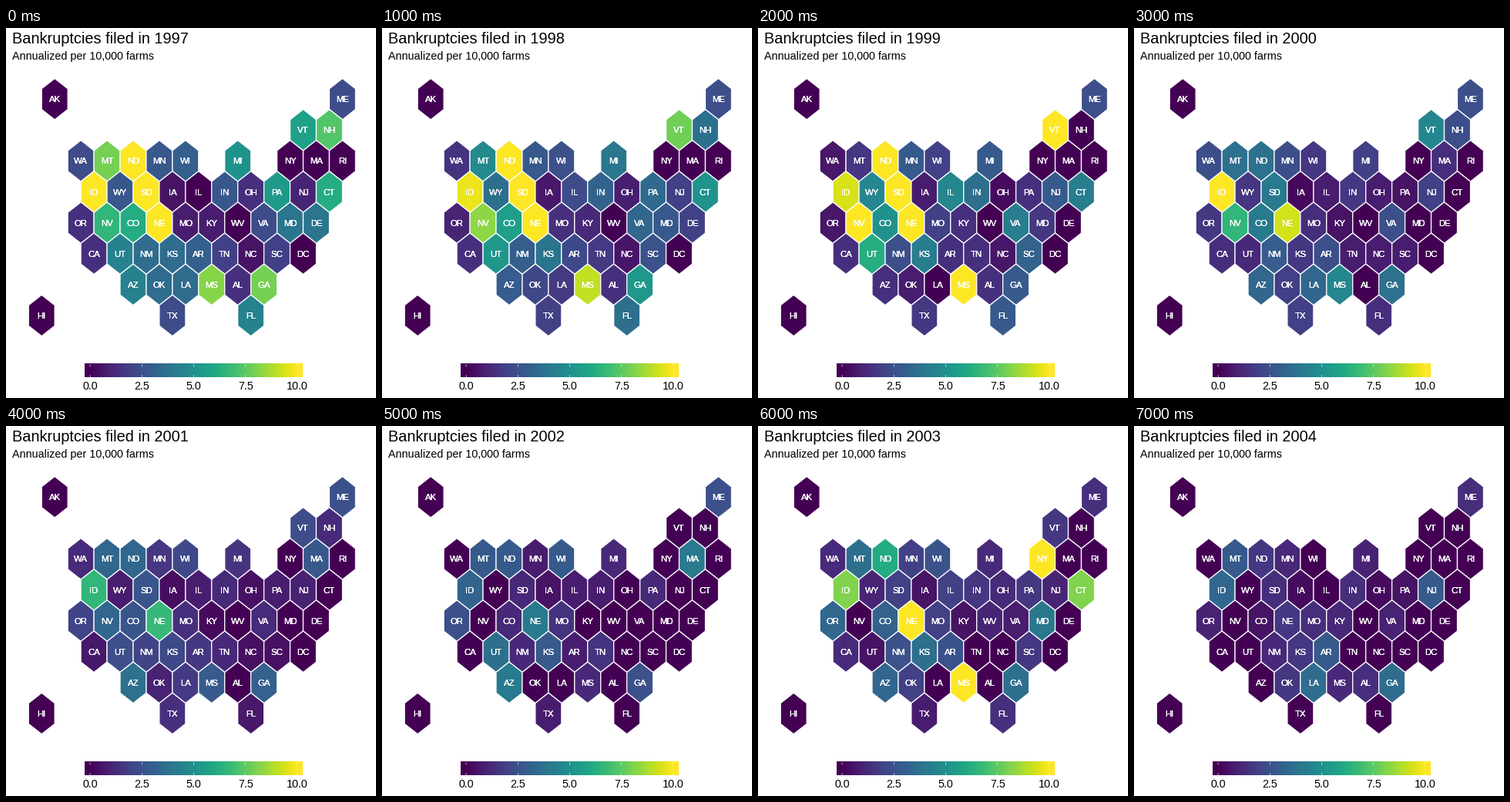
Recreate the animation shown at these times as a matplotlib script. Size 480x480 px, loop 8000 ms.

```python
import matplotlib.pyplot as plt
import numpy as np
from matplotlib.animation import FuncAnimation
from matplotlib.patches import Polygon

SIZE = 480
DPI = 100
PX = 72 / DPI  # points per pixel
FIRST_YEAR, YEARS = 1997, 8

# Hexagon grid: odd rows are shifted left by half a cell.
GRID = """
AK .. .. .. .. .. .. .. .. .. .. ME
.. .. .. .. .. .. .. .. .. .. VT NH
.. WA MT ND MN WI .. MI .. NY MA RI
.. .. ID WY SD IA IL IN OH PA NJ CT
.. OR NV CO NE MO KY WV VA MD DE ..
.. .. CA UT NM KS AR TN NC SC DC ..
.. .. .. AZ OK LA MS AL GA .. .. ..
HI .. .. .. .. TX .. .. FL .. .. ..
"""
LEFT, TOP = 63.2, 92.2
STEP_X, STEP_Y = 33.93, 40.11

# Filings per 10,000 farms; states not listed had none.
RATES = {
    1997: {10: "ND ID SD NE", 8.2: "MS", 7.9: "MT GA", 7.3: "NH", 6.6: "NV",
           6.15: "CO CT", 5.7: "VT", 5.4: "PA", 5.1: "MI", 4.4: "UT AZ FL",
           3.9: "MD DE", 3.5: "NM KS OK LA", 3.0: "WI AR", 2.7: "MN WY IN",
           2.3: "ME WA VA TX", 1.9: "TN SC", 1.4: "OH OR CA AL", 1.0: "NJ",
           0.8: "MO KY", 0.5: "IA NC"},
    1999: {10: "VT ND SD NV NE MS", 9.4: "ID", 6.2: "UT", 5.0: "CO",
           4.6: "WY IL", 4.2: "CT VA KS", 3.6: "IN", 3.1: "SC",
           2.8: "MN MI NJ GA FL", 2.4: "ME NM", 1.9: "WI MO",
           1.6: "MT MD TX", 1.4: "PA KY CA AR AL AZ TN",
           0.8: "IA OK", 0.6: "WA OR NC", 0.3: "OH"},
    2000: {10: "ID", 9.3: "NE", 6.6: "NV", 4.6: "VT MS", 4.1: "SD CO",
           3.7: "MT ND GA", 3.3: "AZ LA", 2.9: "NM",
           2.4: "ME NH WA MN VA AR", 1.9: "MI NJ OK TX",
           1.6: "WI WY IN OR KS", 1.3: "MA MO CA FL", 1.1: "UT",
           0.8: "IL OH TN NC SC", 0.5: "PA KY", 0.2: "IA"},
    2002: {4.1: "MA NE AZ", 3.6: "UT", 3.2: "ID", 2.8: "MT ND WI KS",
           2.45: "ME OR GA", 1.45: "MO TN", 1.1: "MI SD CO NM MS PA",
           0.8: "MN IL IN AR TX", 0.5: "IA"},
    2003: {10: "NY NE MS", 8.1: "ID CT", 6.1: "ND", 4.0: "MD",
           3.6: "MT KS GA", 3.3: "OR AZ", 3.1: "CO", 2.5: "WI NM AR",
           1.95: "MN SD IL OK MO", 1.6: "VT IN PA SC", 1.4: "ME FL",
           1.2: "WA MI OH CA", 1.0: "WY NJ WV", 0.75: "VA TX",
           0.5: "IA KY UT"},
    2004: {3.5: "LA GA", 3.3: "ID", 2.8: "MT NJ AR", 1.6: "ND NE KS OK",
           1.3: "ME SD IN MO AL", 1.1: "MN MS NM KY", 0.95: "MI OR VA",
           0.5: "PA CO", 0.3: "IA OH"},
}


def rate(state, year):
    """Rate of one state; a year without figures lies between its neighbours."""
    if year not in RATES:
        return (rate(state, year - 1) + rate(state, year + 1)) / 2
    return next((v for v, names in RATES[year].items()
                 if state in names.split()), 0)


fig = plt.figure(figsize=(SIZE / DPI, SIZE / DPI), dpi=DPI, facecolor="white")
ax = fig.add_axes([0, 0, 1, 1])
ax.axis("off")
cmap = plt.get_cmap("viridis")


def label(x, y, text, size, **kw):
    return ax.text(x, y, text, fontsize=size * PX, family="Liberation Sans",
                   va="baseline", **kw)


def draw_hexes():
    shape = np.array([(0, -26.75), (17, -13.4), (17, 13.4),
                      (0, 26.75), (-17, 13.4), (-17, -13.4)])
    hexes = {}
    for row, line in enumerate(GRID.split("\n")[1:-1]):
        for col, state in enumerate(line.split()):
            if state == "..":
                continue
            x = LEFT + (col - row % 2 / 2) * STEP_X
            y = TOP + row * STEP_Y
            hexes[state] = ax.add_patch(
                Polygon(shape + (x, y), ec="white", lw=1.3 * PX))
            # Overprinting gives the heavier strokes.
            for _ in range(3):
                label(x, y + 4, state, 11.4, color="white", ha="center",
                      zorder=3)
    return hexes


def draw_legend():
    x0, x1, y0, y1 = 102, 385, 436.2, 453.5
    bins = 20
    ax.imshow(np.linspace(0, 1, bins)[None], cmap=cmap, aspect="auto",
              extent=(x0, x1, y1, y0), interpolation="bilinear")
    half = (x1 - x0) / bins / 2
    for v in np.linspace(0, 10, 5):
        x = x0 + half + v / 10 * (x1 - x0 - 2 * half)
        for a, b in ((y0, y0 + 3.4), (y1 - 3.4, y1)):
            ax.plot([x, x], [a, b], color="white", lw=0.6 * PX, snap=False,
                    solid_capstyle="butt")
        label(x, 469, f"{v:.1f}", 14.4, ha="center")


title = label(8, 20, "", 20)
label(8, 41, "Annualized per 10,000 farms", 14.4)
hexes = draw_hexes()
draw_legend()
ax.set_xlim(0, SIZE)
ax.set_ylim(SIZE, 0)


def update(i):
    year = FIRST_YEAR + i
    title.set_text(f"Bankruptcies filed in {year}")
    for state, patch in hexes.items():
        patch.set_facecolor(cmap(rate(state, year) / 10))
    return [title, *hexes.values()]


anim = FuncAnimation(fig, update, frames=YEARS, interval=1000, repeat=True,
                     repeat_delay=0, blit=False)
plt.show()
```
